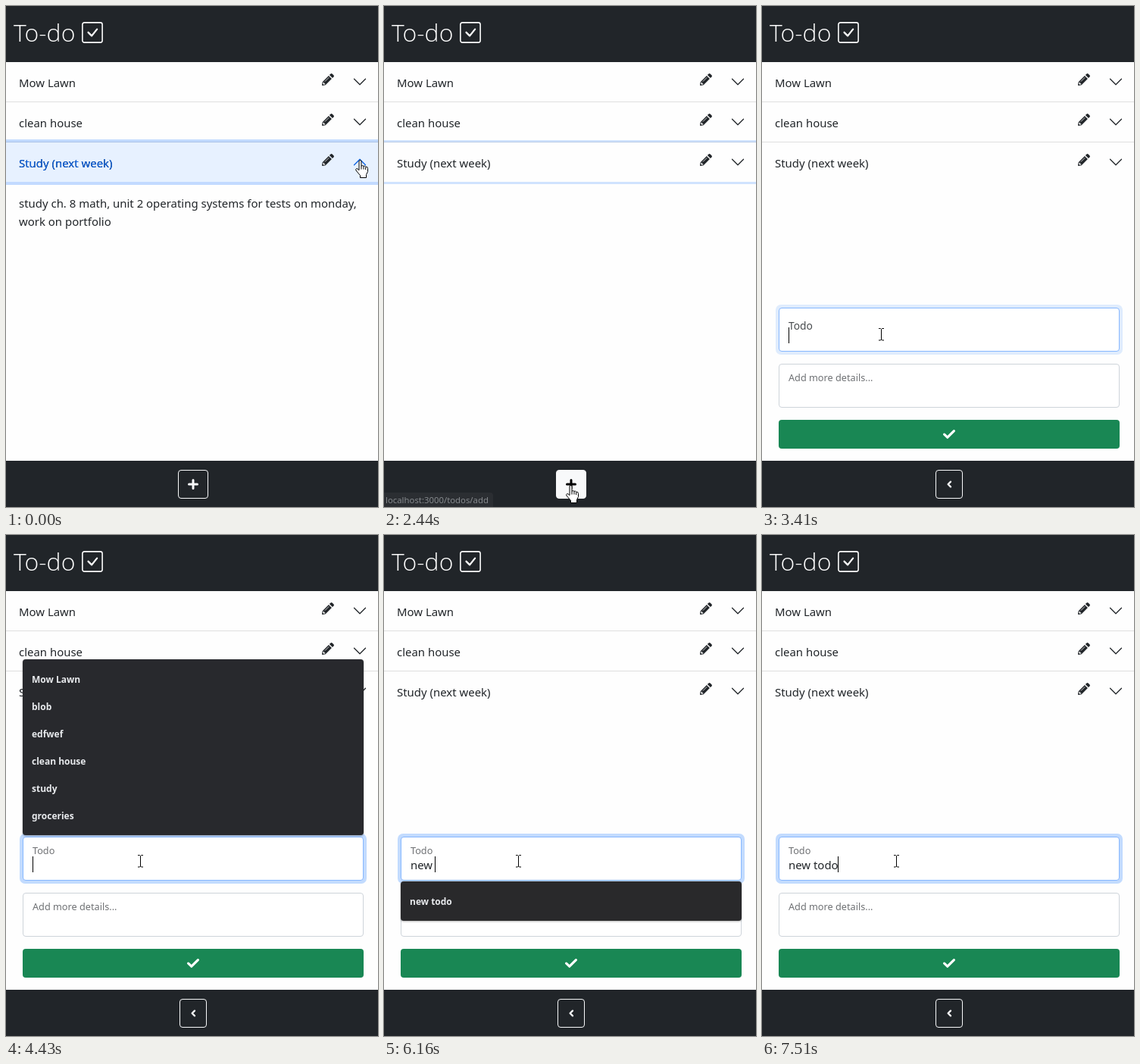
Recreate the animation shown at these times as an HTML page. Size 491 by 661 pixels, loop 8 s.

```html
<!DOCTYPE html>
<html lang="en">
<head>
<meta charset="utf-8">
<title>To-do</title>
<style>
  html, body { margin: 0; width: 100%; height: 100%; overflow: hidden; background: #fefefe; }
  svg { display: block; }
  text { font: 14.95px "Noto Sans", "Open Sans", sans-serif; fill: #212529; white-space: pre; }
  .title { font: 300 32px "Open Sans", "Noto Sans", sans-serif; fill: #fff; }
  .label { font-size: 12.7px; fill: #212529; opacity: .65; }
  .option { font-size: 12px; font-weight: 700; fill: #e8eaed; }
  .status { font-size: 11.35px; fill: #85898d; }
  .line { fill: none; stroke-linecap: round; stroke-linejoin: round; }
  .menu { filter: drop-shadow(0 1px 1px rgba(0, 0, 0, .3)); }
  .cursor { stroke-linejoin: round; }
</style>
</head>
<body>
<svg width="491" height="661" viewBox="0 0 491 661">
  <defs>
    <g id="pencil">
      <path fill="#212529" d="M8.9 3.1L.7 11.3 0 15.1Q0 16 .9 16L4.7 15.3 12.9 7.1zM9.9 2.1L11.5.5Q12.6-.4 13.6.4L15.6 2.4Q16.4 3.4 15.5 4.5L13.9 6.1z"/>
      <path fill="#fff" d="M2.75 13.25h1.5v1.1l-2 .4-1-1 .4-2h1.1z"/>
      <path class="line" stroke="#fff" stroke-width=".8" d="M4.2 10.3L9 5.5"/>
    </g>
    <path id="chevron" class="line" stroke-width="1.25" d="M-7.5-3.75L0 3.75 7.5-3.75"/>
    <clipPath id="bodyClip"><rect id="bodyBox" y="232" width="491" height="80"/></clipPath>
  </defs>

  <rect width="491" height="661" fill="#fefefe"/>
  <rect width="491" height="74" fill="#212529"/>
  <text class="title" x="10" y="47">To-do</text>
  <g class="line" stroke="#fff" transform="translate(100 21) scale(1.75)">
    <rect x=".5" y=".5" width="15" height="15" rx="1.5" stroke-width=".9"/>
    <path stroke-width="1.3" d="M4.9 7.9L7.5 10.5 11.5 5.5"/>
  </g>

  <g clip-path="url(#bodyClip)">
    <text x="17" y="266">study ch. 8 math, unit 2 operating systems for tests on monday,</text>
    <text x="17" y="290">work on portfolio</text>
  </g>
  <rect id="openBg" y="180" width="491" height="52" fill="#e7f1ff"/>
  <g id="rows"></g>
  <text id="openText" x="17" y="213" style="fill:#0c63e4">Study (next week)</text>
  <path id="rowRing" fill="#0d6efd"/>

  <rect y="600" width="491" height="61" fill="#212529"/>
  <g id="addButton">
    <rect id="addBox" x="227.5" y="612.5" width="39" height="37" rx="3.5" stroke="#f8f9fa"/>
    <path id="plus" class="line" stroke-width="3" d="M241.5 631h11M247 625.5v11"/>
  </g>

  <g id="form">
    <rect x="229.5" y="612.5" width="35" height="37" rx="3.5" fill="none" stroke="#f8f9fa"/>
    <path class="line" stroke="#f8f9fa" stroke-width="2.3" d="M249 627.6L245.6 631 249 634.4"/>
    <rect id="inputRing" x="18" y="394" width="458" height="66" rx="7" fill="#c2dbfe"/>
    <rect id="input" x="22.5" y="398.5" width="449" height="57" rx="3.5" fill="#fff"/>
    <text id="todoLabel" x="35">Todo</text>
    <text id="typed" x="35" y="441"></text>
    <rect id="caret" y="424" width="1" height="21" fill="#000"/>
    <rect x="22.5" y="472.5" width="449" height="57" rx="3.5" fill="#fff" stroke="#ced4da"/>
    <text class="label" x="35" y="495">Add more details...</text>
    <rect x="22" y="546" width="450" height="38" rx="4" fill="#198754"/>
    <path class="line" stroke="#fff" stroke-width="3.2" d="M240.6 565.2L244.8 569.2 253.4 560.7"/>
    <g id="longMenu" class="menu"><rect x="22" y="164" width="450" height="232" rx="4" fill="#28292d"/></g>
    <g id="shortMenu" class="menu">
      <rect x="22" y="457" width="450" height="52" rx="4" fill="#29292b"/>
      <text class="option" x="34" y="488">new todo</text>
    </g>
  </g>

  <g id="status">
    <path fill="#2b2e32" d="M0 642h140q4 0 4 4v15H0z"/>
    <text class="status" x="2" y="656">localhost:3000/todos/add</text>
  </g>

  <g id="hand" class="cursor" fill="#fff" stroke="#000">
    <path d="M5 2Q5 .5 6.5.5 8 .5 8 2V8Q9.5 7 11 8.3 12.5 7.5 13.5 9 16.5 8.5 16.5 11.5V15.5L14.5 19.5V23.5H6.5V20.5L1 14Q0 12.2 1.6 11.6 3 11.2 5 13.6z"/>
    <path fill="none" d="M8 8v4.5M11 8.5v4M13.7 9.5v3.5"/>
  </g>
  <path id="arrow" class="cursor" fill="#fff" stroke="#000" d="M.5.8V16.2L4 13 6.3 18.3 8.6 17.3 6.3 12H11.2z"/>
  <path id="beam" fill="none" stroke="#000" d="M0 .5H2.5L3.5 1.5 4.5.5H7M3.5 1.5V15M0 16H2.5L3.5 15 4.5 16H7"/>
</svg>
<script>
const LOOP = 8000;
const $ = id => document.getElementById(id);
const set = (id, attrs) => { for (const k in attrs) $(id).setAttribute(k, attrs[k]); };
const show = (id, on) => { $(id).style.display = on ? "" : "none"; };

// Each track lists [start in ms, value, ...]; a value holds until the next start.
const tracks = {
  body: [[0, 80], [840, 52], [960, 11], [1080, 0]],
  tint: [[0, 1], [840, .45], [960, 0]],
  turn: [[0, 180], [840, 67], [960, 0]],
  ring: [[0, 4, .25], [2440, 3, .19], [2560, 0, 0]],
  hover: [[0, false], [2320, true]],
  status: [[0, false], [2440, true], [2680, false]],
  form: [[0, false], [2680, true]],
  focus: [[0, 0], [3410, .5], [3530, 1]],
  caret: [[0, false], [3410, true], [3930, false], [4430, true], [5760, false], [6160, true]],
  longMenu: [[0, false], [3530, true], [4980, false]],
  shortMenu: [[0, false], [4980, true], [6710, false], [7140, true], [7510, false]],
  typed: [[0, ""], [4980, "n"], [5230, "new"], [6160, "new "], [6440, "new t"], [6560, "new to"],
    [6710, "new to "], [7140, "new to"], [7260, "new tod"], [7510, "new todo"]],
  cursor: [[0, "hand", 461, 203], [1760, "arrow", 412, 330], [1880, "arrow", 325, 515],
    [2030, "arrow", 292, 573], [2180, "arrow", 255, 628], [2320, "hand", 240, 632],
    [2830, "arrow", 237, 599], [2980, "beam", 206, 505], [3110, "beam", 166, 443],
    [3260, "beam", 154, 425], [3780, "beam", 174, 422]]
};
const at = (name, t) => tracks[name].filter(step => step[0] <= t).pop().slice(1);

$("rows").innerHTML = ["Mow Lawn", "clean house", "Study (next week)"].map((name, i) => {
  const y = 53 * i;
  return (i ? `<rect y="${73 + y}" width="491" height="1" fill="#dfdfdf"/>` : "") +
    `<text x="17" y="${107 + y}">${name}</text>
     <use href="#pencil" x="417" y="${89 + y}"/>
     <g transform="translate(467 ${100 + y})"><use href="#chevron" id="chev${i}" stroke="#212529"/></g>`;
}).join("");

$("longMenu").innerHTML += ["Mow Lawn", "blob", "edfwef", "clean house", "study", "groceries"]
  .map((name, i) => `<text class="option" x="34" y="${195 + 36 * i}">${name}</text>`).join("");

function drawList(t) {
  const [tint] = at("tint", t), [size, alpha] = at("ring", t);
  set("bodyBox", { height: at("body", t)[0] });
  set("openBg", { opacity: tint });
  set("openText", { opacity: tint });
  set("chev2", { transform: `rotate(${-at("turn", t)[0]})`, stroke: tint ? "#0c63e4" : "#212529" });
  set("rowRing", { d: `M0 ${180 - size}h491v${size}H0zM0 232h491v${size}H0z`, opacity: alpha });
}

function drawFooter(t) {
  const [hover] = at("hover", t);
  show("addButton", !at("form", t)[0]);
  set("addBox", { fill: hover ? "#f8f9fa" : "none" });
  set("plus", { stroke: hover ? "#000" : "#f8f9fa" });
  show("status", at("status", t)[0]);
}

function drawForm(t) {
  const [focus] = at("focus", t), mix = (a, b) => a + (b - a) * focus;
  show("form", at("form", t)[0]);
  set("inputRing", { opacity: focus });
  set("input", { stroke: focus ? "#86b7fe" : "#ced4da" });
  set("todoLabel", { y: mix(433, 421), opacity: mix(1, .65) });
  $("todoLabel").style.fontSize = mix(14.95, 12.7) + "px";
  const typed = $("typed"), [value] = at("typed", t);
  if (typed.textContent !== value) typed.textContent = value;
  const width = value ? typed.getComputedTextLength() : 0;
  set("caret", { x: Math.floor(35 + width) });
  show("caret", at("caret", t)[0]);
  show("longMenu", at("longMenu", t)[0]);
  show("shortMenu", at("shortMenu", t)[0]);
}

function drawCursor(t) {
  const [kind, x, y] = at("cursor", t);
  for (const id of ["hand", "arrow", "beam"]) show(id, id === kind);
  set(kind, { transform: `translate(${x} ${y})` });
}

const start = performance.now();
function frame() {
  const t = (performance.now() - start) % LOOP;
  drawList(t);
  drawFooter(t);
  drawForm(t);
  drawCursor(t);
  requestAnimationFrame(frame);
}
frame();
</script>
</body>
</html>
```
